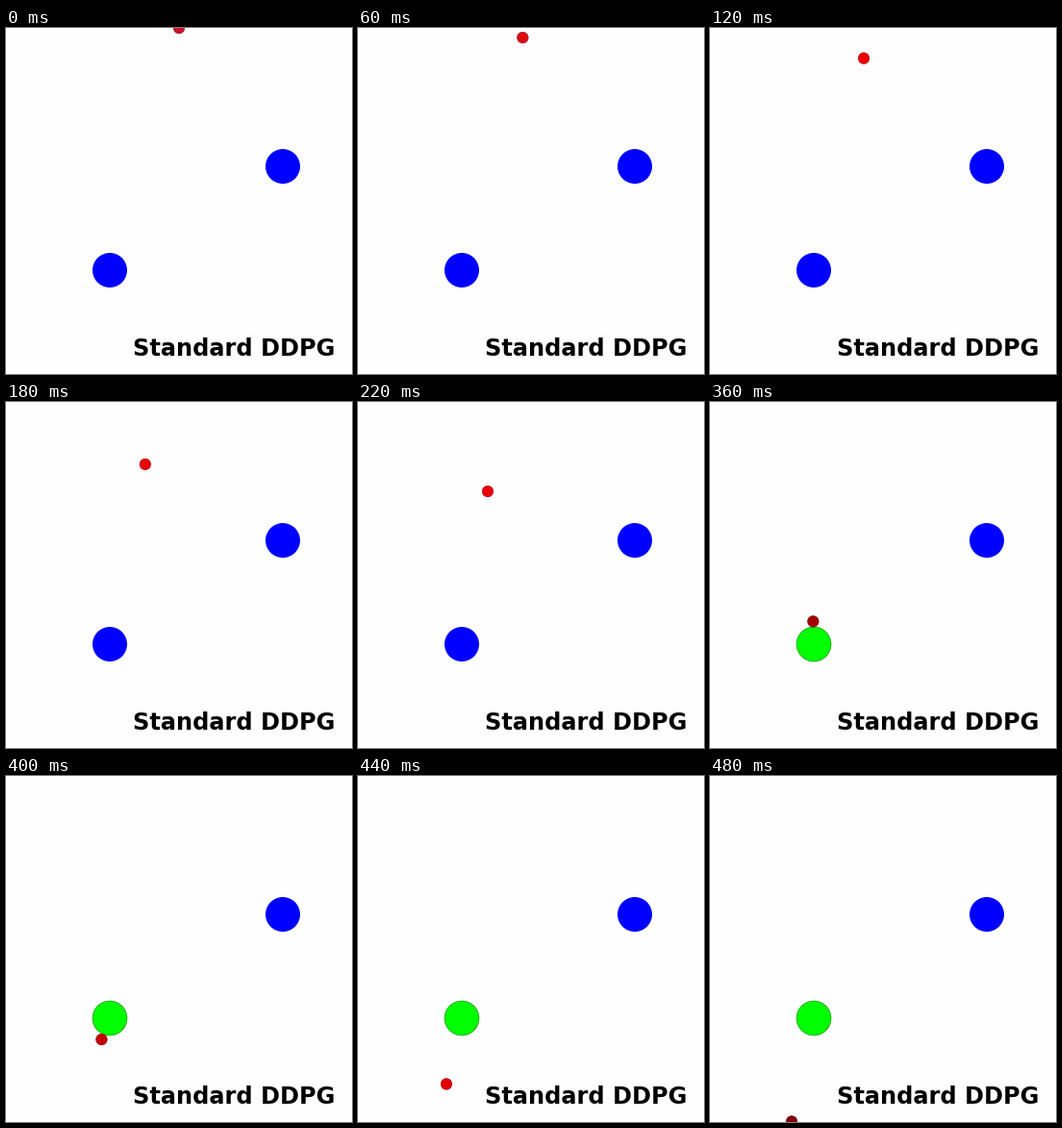
A matplotlib script for the animation above (0.5 s loop, 360 by 360 pixels).

```python
import numpy as np
import matplotlib.pyplot as plt
from matplotlib.animation import FuncAnimation
from matplotlib.patches import Circle

SIZE, STEPS = 360, 25
BLUE, GREEN = "#0000ff", "#00ff00"
GOAL, GOAL_R, BALL_R = (108, 252), 18, 6

# Waypoints of the falling ball: step, x, y
STEP = np.array([0, 6, 11, 15, 18, 22, 24])
X = np.array([180, 160, 135, 120, 107.3, 92, 85])
Y = np.array([0, 31.5, 93, 163, 228.3, 320.5, 366])
FLOOR = 359.5

# Colour of the ball at the same steps
RED = [204, 238, 236, 72, 165, 225, 130]
GREEN_PART = [18, 0, 0, 10, 0, 0, 0]
BLUE_PART = [38, 0, 8, 14, 4, 4, 10]


def smooth(t, values):
    """Cubic Hermite curve through the waypoints."""
    slope = np.gradient(values, STEP, edge_order=2)
    i = np.clip(np.searchsorted(STEP, t, side="right") - 1, 0, len(STEP) - 2)
    span = STEP[i + 1] - STEP[i]
    u = (t - STEP[i]) / span
    return ((1 + 2 * u) * (1 - u) ** 2 * values[i]
            + u * (1 - u) ** 2 * span * slope[i]
            + u * u * (3 - 2 * u) * values[i + 1]
            + u * u * (u - 1) * span * slope[i + 1])


steps = np.arange(STEPS)
path_x = smooth(steps, X)
path_y = np.minimum(smooth(steps, Y), FLOOR)
colors = np.stack([np.interp(steps, STEP, part)
                   for part in (RED, GREEN_PART, BLUE_PART)], axis=1) / 255
touching = np.hypot(path_x - GOAL[0], path_y - GOAL[1]) < GOAL_R + BALL_R + 1
reached = np.logical_or.accumulate(touching)

fig = plt.figure(figsize=(5, 5), dpi=72, facecolor="#fefefe")
ax = fig.add_axes([0, 0, 1, 1])
ax.set_xlim(0, SIZE)
ax.set_ylim(SIZE, 0)
ax.axis("off")

ax.add_patch(Circle((288, 144), GOAL_R, fc=BLUE, lw=0))
goal = ax.add_patch(Circle(GOAL, GOAL_R, fc=BLUE, lw=0))
ball = ax.add_patch(Circle((X[0], Y[0]), BALL_R - 0.2, lw=0.5))
ax.text(131.5, 341, "Standard DDPG", family="DejaVu Sans", weight="bold",
        size=24, color="black", va="baseline")


def draw(i):
    ball.center = path_x[i], path_y[i]
    ball.set_facecolor(colors[i])
    ball.set_edgecolor(colors[i] * 0.6)
    goal.set_facecolor(GREEN if reached[i] else BLUE)
    goal.set_edgecolor("#007000")
    goal.set_linewidth(0.5 if reached[i] else 0)
    return ball, goal


anim = FuncAnimation(fig, draw, frames=STEPS, interval=20,
                     repeat=True, repeat_delay=0)
plt.show()
```
